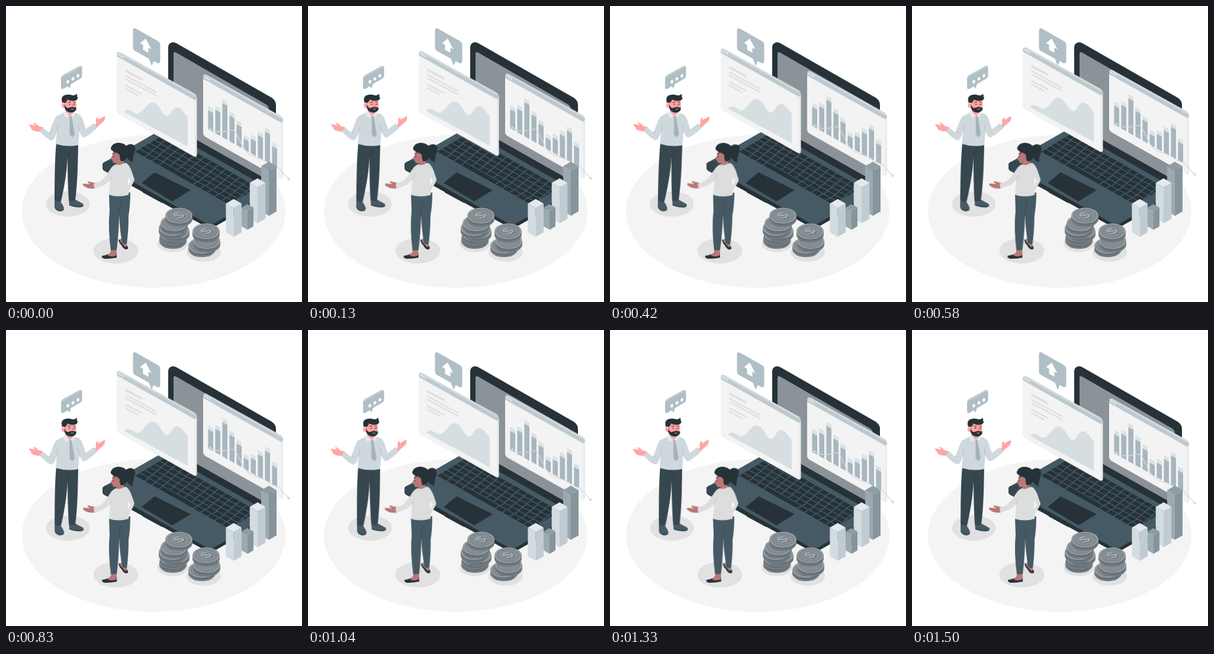
Write an HTML page that moves like this. It is 500 px wide and 500 px high and loops after 1540 ms.

```html
<!DOCTYPE html>
<html lang="en">
<head>
<meta charset="utf-8">
<title>Business growth</title>
<style>
html, body { margin: 0; width: 100%; height: 100%; overflow: hidden; background: #fff; }
svg { display: block; width: 100vw; height: 100vh; }
.float { animation: float 1540ms linear infinite; }
.sway { animation: sway 1540ms linear infinite; }
#man { transform-origin: 103px 248px; }
#woman { transform-origin: 174px 330px; }
@keyframes float {
  0%, 1.3% { transform: translateY(0); }
  46% { transform: translateY(-9.8px); }
  97%, 100% { transform: translateY(0); }
}
@keyframes sway {
  0%, 50%, 100% { transform: rotate(0deg); }
  25% { transform: rotate(.8deg); }
  75% { transform: rotate(-.8deg); }
}
.ink { fill: #263238; }
.slate { fill: #455a64; }
.deep { fill: #37474f; }
.mist { fill: #b0bec5; }
.pale { fill: #cfd8dc; }
.pink { fill: #ffa5a5; }
.tan { fill: #b97876; }
.knit { fill: #dcdddd; }
.line { fill: none; stroke-linecap: round; stroke-linejoin: round; }
</style>
</head>
<body>
<svg viewBox="0 0 500 500">
  <ellipse cx="249.500" cy="347" rx="222.500" ry="129" fill="#f4f4f4"/>
  <g fill="#e1e1e1">
    <ellipse cx="104.500" cy="334.500" rx="37" ry="21.500"/>
    <ellipse cx="185.500" cy="413.500" rx="38" ry="21.500"/>
    <ellipse cx="282" cy="401" rx="26" ry="15"/>
    <ellipse cx="334" cy="416" rx="29" ry="16"/>
  </g>

  <g id="laptop">
    <path class="ink" d="M163 267V273Q163 277 167 279L338 373Q345 377 352 373L452 316V306L268 214Z"/>
    <path class="slate" d="M166 264L262 209Q268 206 274 209L449 305Q454 308 449 311L352 367Q345 371 338 367L166 270Q160 267 166 264Z"/>
    <path class="deep" d="M163 267Q164 263 174 261L189 262V284L167 279Q163 277 163 273Z"/>
    <path class="ink" d="M230 309L262 327Q266 329 264 333L231 315Z"/>
    <path class="ink" d="M251 281L312 311L281 330L229 299Z"/>
    <g id="keys" class="ink"></g>
    <path class="ink" d="M274 70Q274 64 279 62Q283 60 288 63L449 155Q456 160 456 167V315L274 211.500Z"/>
    <path fill="#8b9399" d="M283 81Q283 76 288 79L439 166Q444 169 444 175V295L283 204Z"/>
  </g>

  <path class="mist" d="M214.500 42Q214.500 36 219 38L257 59.500Q260.500 62 260.500 66V92Q260.500 98 256 96.500L249.500 93L246 101L241.500 89L218 76Q214.500 74 214.500 70Z"/>
  <path fill="#fff" d="M236 55L245.500 73L240.500 70.500V79L231.500 74V65.500L226.500 62.500Z"/>
  <path class="mist" d="M93 122Q93 119 96 117L124 101.500Q128.500 100 128.500 105V117Q128.500 121 125 123L109.500 132L107.500 139.500L104 135.500L98 139.500Q93 142 93 137Z"/>
  <path d="M94.500 120L125.500 102.500" class="line" stroke="#c4cfd4" stroke-width="1.500"/>
  <g fill="#fff">
    <ellipse cx="104.500" cy="128" rx="2.200" ry="2.900" transform="rotate(20 104.500 128)"/>
    <ellipse cx="113" cy="123" rx="2.200" ry="2.900" transform="rotate(20 113 123)"/>
    <ellipse cx="121.500" cy="118" rx="2.200" ry="2.900" transform="rotate(20 121.500 118)"/>
  </g>

  <g class="float">
    <g class="panel" transform="translate(333 115)"></g>
    <g id="columns"></g>
    <path class="line" stroke="#d3dbdf" stroke-width="1.300" d="M345 207C355 216 371 212 379 210C392 206 394 235 408 248C418 258 430 255 443 265S459 269 465 279L477.500 292.500"/>
    <g fill="#d3dbdf"><circle cx="345" cy="207" r="2"/><circle cx="477.500" cy="292.500" r="2.200"/></g>
  </g>
  <g class="float">
    <g class="panel" transform="translate(187.500 77)"></g>
    <g class="line" stroke="#dedede">
      <path stroke-width="3.600" stroke-linecap="butt" d="M201.500 109L230 124.500"/>
      <path stroke-width="2.200" stroke-linecap="butt" d="M201.500 117.500L254 146M201.500 123L254 151.500M201.500 134L230 149M201.500 139.500L223 151.500"/>
    </g>
    <path fill="#d7dee1" d="M199.500 179C206 171 212 178 220 182C233 182 237 162 248 163C260 164 263 185 272 186C280 184 280 171 290 171C299 173 302 184 307 187V237.500Z"/>
  </g>

  <g id="blocks"></g>
  <g id="coins"></g>

  <g id="man" class="sway">
    <path class="pink" d="M63 205L55 203Q51 198 46 197Q47 200 50 202L40 200Q37 201 42 205Q42 209 48 211Q54 213 61 212Z"/>
    <path class="pink" d="M147 203L152 199Q151 191 154 188Q157 189 156 192L164 187Q169 185 167 189Q168 193 160 199L150 208Z"/>
    <path class="slate" d="M82 328L82 340Q83 345 90 347Q98 347 98 342Q98 339 92 330ZM106 327L107 337Q119 341 127 340Q133 338 130 334L117 327Z"/>
    <path class="line" stroke="#263238" stroke-width=".7" d="M83 341Q87 346 97 345M107 336Q120 340 130 338"/>
    <path class="deep" d="M85 231L122 234L121 275Q120 304 117 328Q111 331 106 328Q104 300 104 254Q103 285 93 330Q87 332 82 328Q82 260 85 231Z"/>
    <path class="line" stroke="#263238" stroke-width=".8" d="M104 254Q105 248 109 243"/>
    <path class="pale" d="M92 183Q84 185 81 193L73 214L62 205L57 212Q68 224 76 227Q81 227 84 218L86 212L84 233Q103 239 122 235L124 211Q126 219 131 222Q136 222 154 206L148 198L135 208L129 190Q126 183 119 181L102 177Z"/>
    <path class="line" stroke="#a9b7be" stroke-width=".8" d="M86 212L88 202M124 211L122 200M73 214L77 213"/>
    <path class="pink" d="M101 169H115L113 181L108 186L101 179Z"/>
    <path fill="#e4eaed" d="M100 177L107 186L101 189L96 181ZM114 179L109 186L113 188L118 181Z"/>
    <path fill="#a4b2ba" d="M107 186H111L111.500 190L116 217L112.500 222L107.500 217L107.500 190Z"/>
    <path class="pink" d="M98 157Q107 150 118 155L119 171Q117 179 110 180Q101 180 99 172Q93 173 94 166Q96 162 98 165Z"/>
    <path class="ink" d="M95 164Q92 154 98 151Q105 148 113 151Q118 151 119 148Q121 151 120 153Q123 155 119 159Q111 162 104 158Q102 163 99 164Q97 162 95 164Z"/>
    <path class="ink" d="M99 166Q102 174 106 172Q112 169 119 172Q119 178 112 180Q102 181 99 172Z"/>
    <path class="line" stroke="#263238" stroke-width="1" d="M105 163L109 162M114 162L117 163"/>
    <circle class="ink" cx="107.500" cy="166" r="1"/><circle class="ink" cx="115.500" cy="166" r="1"/>
    <path class="line" stroke="#e96f70" stroke-width="1" d="M112 165L113.500 169L111.500 169.500"/>
    <path class="line" stroke="#f0a0a0" stroke-width="1.200" d="M110 174Q112 174.500 114 174"/>
  </g>

  <g id="woman" class="sway">
    <path class="tan" d="M151 299L142 297Q137 295 138 298L142 301L131 300Q128 302 133 305Q140 310 151 308Z"/>
    <path class="ink" d="M162 422Q169 421 176 418L187 417V425Q178 427 167 427Q161 426 162 422ZM190 394Q197 397 204 404Q208 410 204 411Q199 412 195 404Q191 401 190 394Z"/>
    <path class="tan" d="M178 410H187L186.500 421Q179 425 171 421Q177 418 178 410ZM193 393H204V403Q205 407 201 407Q197 402 193 398Z"/>
    <path class="slate" d="M174 317L210 315Q210 337 207 354Q207 380 204 402Q200 403 196 400Q192 375 191 352Q191 379 187 412L177 413Q172 375 175 346Z"/>
    <path class="line" stroke="#37474f" stroke-width=".9" d="M191 352Q191 340 195 330"/>
    <path class="knit" d="M187 267L203 265Q209 269 213 281L217 293Q216 299 208 309L207 319Q190 324 174 319L176 294Q168 304 149 308L148 300Q161 297 166 290L176 276Q180 269 187 267Z"/>
    <path fill="#f4f4f4" d="M206 289L211 295L206 304Z"/>
    <path class="line" stroke="#bdbdbd" stroke-width=".8" d="M176 294L180 285M208 309L205 306"/>
    <path class="tan" d="M181 242L197 244L199 265Q194 270 187 268L187 265Q181 267 180 261L177 257L180 252Z"/>
    <path class="ink" d="M177 240Q179 232 189 231Q198 231 203 236Q210 231 216 235Q220 240 217 248Q214 255 214 264Q208 262 204 256Q201 263 194 262Q192 259 192 252Q188 247 184 248L181 245Q177 244 177 240Z"/>
    <ellipse class="tan" cx="189" cy="254" rx="2.800" ry="4"/>
    <path class="line" stroke="#263238" stroke-width="1" d="M180 250L183 249M181.500 254V255"/>
  </g>
</svg>
<script>
const K = .565;
const $ = s => document.querySelector(s);
const poly = (pts, fill) =>
  `<polygon points="${pts.map(p => p.map(n => n.toFixed(1))).join(' ')}"${fill ? ` fill="${fill}"` : ''}/>`;

// Keyboard: u runs down-right, v runs down-left.
const key = (u, v) => [267 + u - v, 217 + u * K + v * .6];
let keys = '';
for (let r = 0; r < 6; r++) {
  const v0 = r * 8.3, v1 = v0 + 6.900;
  for (let u = 0, c = 0; u < 158; c++) {
    const wide = r === 5 && c === 3 ? 58 : c === 0 ? 9 + r * 1.500 : 12;
    const end = Math.min(u + wide, 160);
    keys += poly([key(u, v0), key(end - 1.600, v0), key(end - 1.600, v1), key(u, v1)]);
    u = end;
  }
}
$('#keys').innerHTML = keys;

const panel = `
  <path fill="#e9ebec" d="M0 5Q0 0 5 1L131 71Q135 74 135 79V174Q135 179 130 177L4 106Q0 103 0 99Z"/>
  <path fill="#f3f3f3" d="M0 6L131.500 79V177.500L4 106Q0 103 0 99Z"/>
  <path fill="#bdc9ce" d="M0 8V5Q0 -1 6 1.500L131 71Q135 74 135 80L131.500 82Z"/>
  <path fill="#d2dade" d="M1 2Q3 0 6 1.500L131 71L134 75L131.500 75Z"/>
  ${[3.500, 7, 10.500].map(x => `<ellipse cx="${x}" cy="${x * K + 3.500}" rx="1" ry="1.400" fill="#fff"/>`).join('')}`;
document.querySelectorAll('.panel').forEach(p => p.innerHTML = panel);

const tops = [169, 168, 157, 178, 193, 217, 217, 211, 205, 230];
$('#columns').innerHTML = tops.map((y, i) => {
  const x = 341.500 + i * 12, base = 208 + i * 12 * K;
  const col = (top, fill) => poly([[x, top], [x + 8.500, top + 8.500 * K], [x + 8.500, base + 8.500 * K], [x, base]], fill);
  return col(y, '#dce2e5') + col(y + 7, '#a8b6be');
}).join('');

const block = (x, top, foot, w, colors) => {
  const h = w * .58, mid = top + h;
  return poly([[x - w, mid], [x, mid + h], [x, foot], [x - w, foot - h]], colors[0]) +
    poly([[x, mid + h], [x + w, mid], [x + w, foot - h], [x, foot]], colors[1]) +
    poly([[x, top], [x + w, mid], [x, mid + h], [x - w, mid]], colors[2]);
};
const light = ['#d3dce0', '#c1ccd2', '#e3e9ec'];
const dark = ['#9ba9b1', '#87949c', '#8f9ca4'];
$('#blocks').innerHTML =
  block(444, 263, 354.500, 13, dark) +
  block(425, 291, 367, 13.300, light) +
  block(408, 334.500, 378, 10, dark) +
  block(384.700, 326, 390, 13.300, light);

const coin = ([x, y], face) => `<g transform="translate(${x} ${y})">
  <path fill="#687178" d="M-23 0V6A23 13.300 0 0 0 23 6V0Z"/>
  <path class="line" stroke="#858e94" stroke-width="1.300" stroke-dasharray="1 2.200" stroke-linecap="butt" d="M-22 5A22 13 0 0 0 22 5"/>
  <ellipse rx="23" ry="13.300" fill="#939b9f"/>
  <ellipse rx="19" ry="10.700" fill="#858e93" stroke="#717b81"/>
  ${face ? `<g transform="matrix(.9 -.44 .8 .46 0 0)" font-family="Arial, 'Liberation Sans', sans-serif" font-weight="700" font-size="23" text-anchor="middle">
    <text y="9" fill="#59636a">$</text><text y="7.500" fill="#abb2b6">$</text></g>` : ''}</g>`;
const stack = (...at) => at.map((p, i) => coin(p, i === at.length - 1)).join('');
$('#coins').innerHTML =
  stack([282, 391], [283, 385], [287, 380], [281, 375], [284, 367], [292, 354]) +
  stack([331, 405], [339, 397], [338, 380.500]);
</script>
</body>
</html>
```
